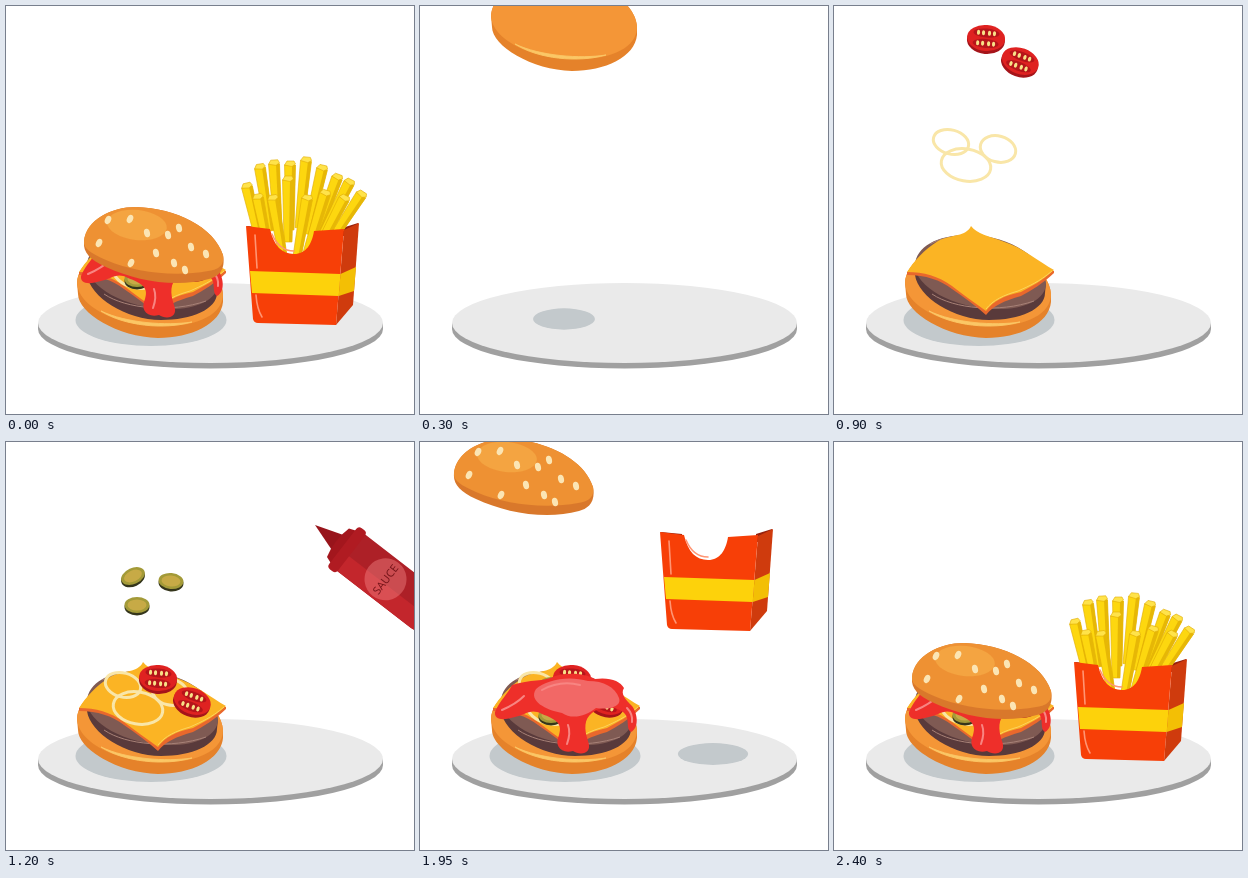
These frames come from a looping animation (408 by 408 pixels, 2.85 s). An HTML page:

```html
<!DOCTYPE html>
<html lang="en">
<head>
<meta charset="utf-8">
<title>Burger and fries</title>
<style>
html, body { margin: 0; width: 100%; height: 100%; overflow: hidden; background: #fff; }
svg { display: block; width: 100%; height: 100%; }
</style>
</head>
<body>
<svg viewBox="0 0 408 408">
  <g id="plate">
    <path d="M32 317V323A172.5 39.5 0 0 0 377 323V317Z" fill="#a0a0a0"/>
    <ellipse cx="204.5" cy="317" rx="172.5" ry="40" fill="#eaeaea"/>
  </g>
  <ellipse id="bunShadow" rx="75.5" ry="26" fill="#c3c9cc"/>
  <ellipse id="boxShadow" rx="45" ry="14" fill="#c3c9cc"/>

  <g id="burger">
    <g id="base">
      <path d="M71 277C72 255 100 237 137 238C180 238 216 264 217 288V296C215 318 185 332 152 332C112 331 72 307 72 288Z" fill="#e5822a"/>
      <path d="M71 277C72 255 100 237 137 238C180 238 216 264 217 288C217 309 190 321 155 320C110 320 72 300 71 277Z" fill="#f49637"/>
      <path d="M95 305C118 320 158 324 186 316C160 320 120 317 95 305ZM98 247Q117 238 140 239" fill="#fbc766" stroke="#fbc766" stroke-width=".9"/>
    </g>
    <g id="patty">
      <path d="M81 152V162C84 184 120 207 155 207C186 207 211 196 211 180L212 170Z" fill="#593a3b"/>
      <path d="M81 152C82 133 105 121 137 122C177 123 211 146 212 170C212 188 188 197 160 196C120 195 81 174 81 152Z" fill="#7f5a53"/>
      <path d="M98 181C120 196 165 200 200 188M96 131Q112 122 138 123" fill="none" stroke="#a78177"/>
    </g>
    <g id="cheese">
      <path d="M73 46L73 49C92 49 106 54 118 63C130 71 142 80 152 89C160 79 170 75 187 70C198 64 208 58 220 47V45Z" fill="#e9682c"/>
      <path d="M137 0C143 8 155 10 168 15C190 22 205 36 220 44C208 55 198 60 187 66C170 70 160 74 152 85C140 76 128 68 118 60C104 50 90 46 73 46C80 35 90 24 104 15C118 8 132 11 137 0Z" fill="#fbb424"/>
      <path d="M218 45C205 56 195 60 184 65C170 69 159 74 152 83" fill="none" stroke="#fdd35c"/>
    </g>
    <g id="onions" fill="none" stroke="#f9e6a8" stroke-width="3">
      <ellipse cx="117" cy="243" rx="18" ry="12" transform="rotate(15 117 243)"/>
      <ellipse cx="164" cy="250" rx="18" ry="13" transform="rotate(15 164 250)"/>
      <ellipse cx="132" cy="266" rx="25" ry="16" transform="rotate(10 132 266)"/>
    </g>
    <g id="tomatoes"></g>
    <g id="pickles"></g>
    <g id="sauce">
      <path d="M75 270C80 258 88 252 92 243C110 237 125 240 135 234C150 230 165 232 175 237C190 235 200 239 204 246C200 252 206 258 212 264C218 272 219 286 211 290C205 286 211 276 203 270C195 264 180 264 172 271C164 277 164 287 168 299C173 312 160 314 153 309C141 312 134 304 139 293C143 281 135 277 122 272C110 266 106 273 95 275C85 278 74 279 75 270Z" fill="#ee2f2a"/>
      <path d="M116 247C126 238 148 233 168 239C184 239 195 245 199 256C202 265 188 268 176 266C166 274 152 278 142 271C126 268 108 259 116 247Z" fill="#f26866"/>
      <path d="M82 268Q96 262 104 254M147 302Q151 291 148 283M207 266Q213 272 212 280M122 248Q140 238 160 243" fill="none" stroke="#f88582" stroke-width="2" stroke-linecap="round"/>
    </g>
    <path id="cone" d="M156 207C153 220 130 232 124 242C116 255 114 265 128 267C140 270 150 280 163 276C178 270 190 270 200 262C204 250 185 238 172 228C165 222 161 215 156 207Z" fill="#f1686a"/>
    <g id="lid">
      <path d="M78 150C80 128 105 115 130 115C170 116 208 135 217 163C220 178 212 185 203 187C170 196 130 189 100 175C84 168 77 160 78 150Z" fill="#d9782b"/>
      <path d="M78 149C80 128 105 115 130 115C170 116 208 135 217 163C219 174 211 178 202 179C170 185 130 181 100 168C84 161 77 156 78 149Z" fill="#ee9133"/>
      <ellipse cx="131" cy="133" rx="30" ry="15" transform="rotate(6 131 133)" fill="#f4a441"/>
    </g>
  </g>

  <g id="bottle">
    <path d="M0 0L-10 -30H10Z" fill="#98141b"/>
    <path d="M-23 -44V-138Q-23 -151 -10 -151H10Q23 -151 23 -138V-44Z" fill="#ad2027"/>
    <path d="M4 -44V-151H10Q23 -151 23 -138V-44Z" fill="#c3262c"/>
    <path d="M-18 -29Q0 -24 18 -29L21 -37H-21Z" fill="#a3161d"/>
    <rect x="-26" y="-46" width="52" height="11" rx="4" fill="#b01b22"/>
    <circle cy="-89" r="21" fill="#ff9a9a" opacity=".36"/>
    <text transform="translate(0 -89) rotate(180)" y="4" text-anchor="middle" font-family="'Open Sans', sans-serif" font-size="11" fill="#741318">SAUCE</text>
  </g>

  <path id="boxBack" d="M241 220L262 222V232H244ZM352 217L336 222V230H351Z" fill="#96210d"/>
  <g id="fries"></g>
  <g id="box">
    <path d="M338 224L353 217L347 299L330 319Z" fill="#cf3b0d"/>
    <path d="M240 220L264 223C268 240 276 248 288 248C300 248 306 238 308 225L338 223L330 319L252 317Q248 317 247 313Z" fill="#f73f07"/>
    <path d="M244 265L334.500 268L332.700 290L246 287Z" fill="#fdd20b"/>
    <path d="M334.500 268L350 261L348 285L332.700 290Z" fill="#f3bf05"/>
    <path d="M249 229L251 262M250 289Q251 303 256 311M266 228C271 240 278 245 288 245" fill="none" stroke="#ff9573" stroke-width="1.600" stroke-linecap="round"/>
  </g>
</svg>
<script>
const $ = id => document.getElementById(id);
const move = (x, y) => `translate(${x} ${y})`;
const NS = 'http://www.w3.org/2000/svg';

function add(parent, tag, attrs) {
  const node = document.createElementNS(NS, tag);
  for (const key in attrs) node.setAttribute(key, attrs[key]);
  return parent.appendChild(node);
}
function oval(parent, cx, cy, rx, ry, fill, turn = 0) {
  return add(parent, 'ellipse', { cx, cy, rx, ry, fill, transform: `rotate(${turn} ${cx} ${cy})` });
}

for (const [x, y, turn] of [[152, 237, 5], [186, 260, 20]]) {
  const slice = add($('tomatoes'), 'g', { transform: `${move(x, y)} rotate(${turn})` });
  oval(slice, 0, 1.5, 19, 13.5, '#a5141a');
  oval(slice, 0, -1, 19, 13, '#df2221');
  oval(slice, 0, -6, 13, 4.5, '#b5151a');
  oval(slice, 0, 4.5, 13, 4.5, '#b5151a');
  for (const sx of [-8, -3, 3, 8]) {
    oval(slice, sx, -6, 1.6, 2.5, '#f8e187');
    oval(slice, sx, 4.5, 1.6, 2.5, '#f8e187');
  }
}

for (const [x, y, turn] of [[127, 134, -25], [165, 139, 5], [131, 163, 0]]) {
  oval($('pickles'), x, y + 2, 12.5, 8.5, '#34351b', turn);
  oval($('pickles'), x, y, 12.5, 8, '#a39a38', turn);
  oval($('pickles'), x, y, 9.5, 5.5, '#c7aa46', turn);
}

const seeds = [[93, 151], [102, 128], [124, 127], [141, 141], [125, 171], [150, 161],
  [162, 143], [173, 136], [168, 171], [185, 155], [179, 178], [200, 162]];
for (const [x, y] of seeds) oval($('lid'), x, y, 3, 4.3, '#fbe5b4', x < 130 ? 25 : -12);

// Each part maps a step to its transform; the pose holds until the next entry.
const tracks = [
  ['plate', { 1: move(0, 75), 2: '' }],
  ['bunShadow', { 2: move(144, 313) + 'scale(.41)', 3: move(145, 313) + 'scale(.7)', 4: move(145, 314) }],
  ['boxShadow', { 12: move(293, 312) + 'scale(.57)', 13: move(293, 312) + 'scale(.78)', 14: null }],
  ['burger', { 1: '', 15: move(147, 332) + 'scale(1.02 .95)' + move(-147, -332), 16: '' }],
  ['base', { 2: move(0, -267), 3: move(0, -130), 4: '' }],
  ['patty', { 3: move(0, -130), 4: '', 5: move(0, 107) }],
  ['cheese', { 4: '', 5: move(0, 110), 6: move(0, 220) }],
  ['onions', { 5: move(0, -215), 6: move(0, -107), 7: '' }],
  ['tomatoes', { 6: move(0, -204), 7: move(0, -102), 8: '' }],
  ['pickles', { 7: move(0, -108), 8: '', 9: move(0, 110) }],
  ['sauce', { 9: move(90, 145) + 'scale(.42)', 10: move(24, 71) + 'scale(.84 .71)', 11: '' }],
  ['cone', { 9: move(94, 83) + 'scale(.4 .6)', 10: move(23, 21) + 'scale(.85 .9)', 11: '', 12: null }],
  ['lid', { 13: move(-44, -118), 14: '', 15: move(0, 90), 16: move(0, 86) }],
  ['bottle', { 8: move(309, 83) + 'rotate(127.6)', 9: move(157, 207) + 'rotate(40.7)', 12: null }]
].map(([id, poses]) => [$(id), poses]);

const boxPoses = { 12: move(0, -270), 13: move(0, -130), 14: move(0, 38.3) + 'scale(1 .88)', 15: '' };
tracks.push([$('box'), boxPoses], [$('boxBack'), boxPoses]);

// Top and foot of every stick, back row first.
const sticks = [
  [268, 158, 272, 222], [284, 159, 284, 224], [300, 155, 293, 222], [254, 162, 264, 225],
  [316, 163, 301, 228], [331, 172, 309, 232], [241, 181, 254, 236], [343, 177, 316, 230],
  [282, 174, 282, 236], [252, 192, 263, 246], [355, 189, 323, 238], [338, 193, 311, 245],
  [267, 193, 277, 250], [319, 188, 300, 251], [301, 193, 291, 251]
];
for (const [x, y, footX, footY] of sticks) {
  const turn = Math.atan2(x - footX, footY - y) * 180 / Math.PI;
  const length = Math.hypot(x - footX, y - footY);
  const place = (spread, dy) => move(x + (x - 298) * spread, y + dy) + `rotate(${turn})`;
  const stick = add($('fries'), 'g', {});
  add(stick, 'path', { d: `M-5.500 0H5.500L4 ${length}H-4Z`, fill: '#fdd70f', stroke: '#e2ae05', 'stroke-width': .6 });
  add(stick, 'path', { d: `M2 0H5.500L4 ${length}H1Z`, fill: '#e6b706' });
  add(stick, 'path', { d: 'M-5.500 0L-3 -4H4L5.500 -1L2 1.500Z', fill: '#ffe34a', stroke: '#e2ae05', 'stroke-width': .6 });
  tracks.push([stick, { 14: place(.27, -155), 15: place(.3, -88), 16: place(0, 0) }]);
}

const STEP = 150, LAST = 16, LOOP = 2850;
const start = performance.now();
let shown = -1;

function show(step) {
  for (const [node, poses] of tracks) {
    let key = step;
    while (key > 0 && !(key in poses)) key--;
    const pose = poses[key] ?? null;
    node.style.display = pose === null ? 'none' : '';
    if (pose !== null) node.setAttribute('transform', pose);
  }
}
function tick() {
  const time = (performance.now() - start) % LOOP;
  const step = Math.min(LAST, Math.floor(time / STEP)) || LAST; // the loop opens on the finished meal
  if (step !== shown) show(shown = step);
  requestAnimationFrame(tick);
}
tick();
</script>
</body>
</html>
```
